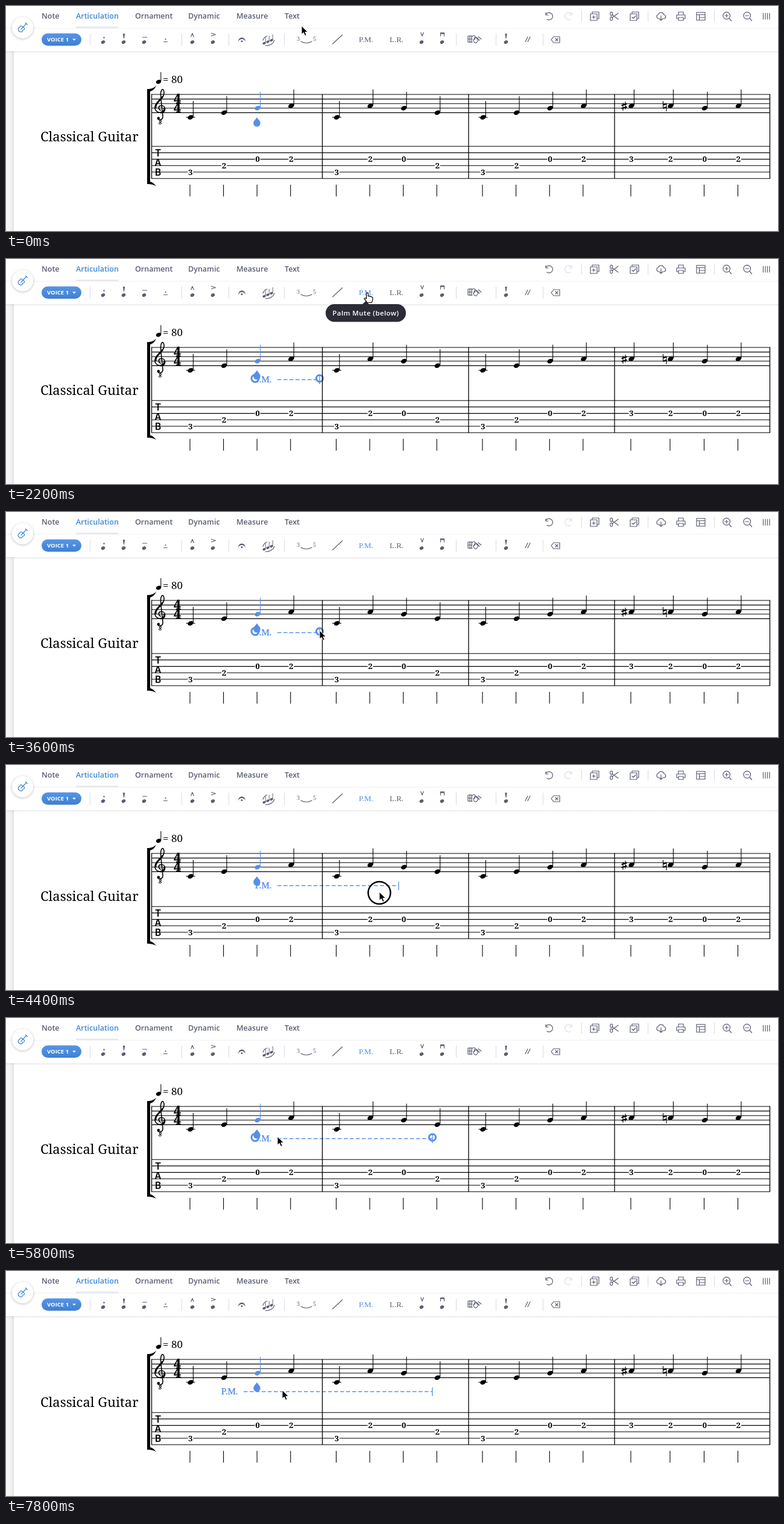
These frames come from a looping animation (1280 by 374 pixels, 8 s). An HTML page:

```html
<!DOCTYPE html>
<html lang="en">
<head>
<meta charset="utf-8">
<title>Palm mute demo</title>
<style>
html, body { margin: 0; height: 100%; overflow: hidden; background: #fff; }
svg { display: block; width: 100vw; height: 100vh; }
.ui { font: 600 12.5px "Open Sans", "Noto Sans", sans-serif; fill: #5a5e72; }
.serif { font: 13px "Liberation Serif", "Times New Roman", serif; }
.score { font-family: "Noto Serif", serif; }
.tab { font: bold 13px "Noto Serif", serif; text-anchor: middle; }
.icon { fill: none; stroke: #5a5e72; stroke-width: 1.2; stroke-linecap: round; stroke-linejoin: round; }
.solid { fill: #5a5e72; stroke: none; }
</style>
</head>
<body>
<svg id="stage" viewBox="0 0 1280 374" preserveAspectRatio="none">
  <defs>
    <linearGradient id="fade" x2="0" y2="1"><stop stop-color="#000" stop-opacity=".08"/><stop offset="1" stop-color="#000" stop-opacity="0"/></linearGradient>
    <linearGradient id="edge"><stop stop-color="#f7f7f7"/><stop offset=".6" stop-color="#f3f3f3"/><stop offset="1" stop-color="#e2e2e2"/></linearGradient>
    <linearGradient id="pill" x2="0" y2="1"><stop stop-color="#5596e6"/><stop offset="1" stop-color="#417fd2"/></linearGradient>
    <filter id="soft" x="-50%" y="-50%" width="200%" height="200%"><feDropShadow dx="0" dy="1" stdDeviation="2" flood-opacity=".28"/></filter>
  </defs>
  <rect width="1280" height="374" fill="#fff"/>
  <rect y="75" width="13" height="299" fill="url(#edge)"/>
  <g id="music"></g>
  <g id="lower"></g>
  <text id="name" class="score" x="57" font-size="22">Classical Guitar</text>
  <g id="mute" fill="none" stroke="#568fe6">
    <text id="label" y="205" class="serif" style="font-size:15px" fill="#568fe6" stroke-width=".35">P.M.</text>
    <path id="dash" stroke-width="1.3" stroke-dasharray="6.5 3.5"/>
    <path id="tick" stroke-width="1.3"/>
    <g id="handles" stroke-width="3">
      <circle id="from" cy="198.5" r="6" fill="#fff"/>
      <circle id="to" cy="198.5" r="5.5"/>
    </g>
  </g>
  <path d="M416 185C418 188.500 421.800 191 421.800 194.800A5.800 5.800 0 0 1 410.200 194.800C410.200 191 414 188.500 416 185Z" fill="#568fe6"/>
  <g id="bars"></g>
  <g id="tip">
    <path d="M590 76L596.500 70L603 76Z" fill="#2b2c38"/>
    <rect x="530" y="75" width="133" height="29.500" rx="14.500" fill="#2b2c38"/>
    <text x="596.500" y="94.300" text-anchor="middle" class="ui" style="font-size:11.5px;letter-spacing:.4px;fill:#fff">Palm Mute (below)</text>
  </g>
  <circle id="ring" r="18.500" fill="none" stroke="#000" stroke-width="2.500"/>
  <path id="arrow" d="M0 0V14.200L3.300 11.200L5.700 16.500L8.200 15.400L5.900 10.300H10.300Z" stroke="#fff" stroke-width="1"/>
  <path id="hand" d="M-1.500 8V1.200Q0-1 1.500 1.200V6Q3.200 4.800 4.300 6.400Q6 5.500 7 7.200Q9 6.800 9 9V12Q8 14 7.500 16.500H-.5Q-1.500 14-5 10Q-4.500 7.500-1.500 10Z" fill="#fff" stroke="#000" stroke-width="1.200" stroke-linejoin="round"/>
</svg>
<script>
const $ = id => document.getElementById(id);
const BLUE = '#568fe6', GREY = '#5a5e72';
const line = (d, color = '#000', w = 1.1) => `<path d="${d}" fill="none" stroke="${color}" stroke-width="${w}"/>`;
const text = (x, y, s, attrs = '') => `<text x="${x}" y="${y}" ${attrs}>${s}</text>`;
const head = (x, y, color = '#000', rx = 5, ry = 3.5) =>
  `<ellipse rx="${rx}" ry="${ry}" fill="${color}" transform="translate(${x} ${y}) rotate(-24)"/>`;
const icon = (x, y, d, extra = '') => `<g class="icon" transform="translate(${x} ${y})"><path d="${d}"/>${extra}</g>`;
const solid = d => `<path class="solid" d="${d}"/>`;

// Notes
const pitch = { C: [185, 3, 4], E: [177.3, 2, 3], G: [169.8, 0, 2], A: [166, 2, 2] };
const columns = [306, 548.5, 791].flatMap(x => [0, 1, 2, 3].map(i => x + i * 55.6)).concat(1037, 1102, 1158.500, 1214.500);
const notes = [...'CEGACAGECEGAAAGA'].map((p, i) => ({ x: columns[i], p, i }));
const barlines = [241.5, 524.5, 767, 1009, 1266.5];

function drawNote({ x, p, i }) {
  const y = pitch[p][0], color = i === 2 ? BLUE : '#000';
  return head(x, y, color) + line(`M${x + 4.400} ${y - 1}V${y - 27.300}`, color) +
    (p === 'C' ? line(`M${x - 7.500} 185H${x + 7.500}`) : '');
}

let music = '';
for (let i = 0; i < 5; i++) music += line(`M241 ${147 + i * 7.600}H1267`);
music += notes.map(drawNote).join('');
music += line('M1023 161V174M1027 159V172') + line('M1020.500 165.500L1029.500 162.500M1020.500 170.500L1029.500 167.500', '#000', 2.2);
music += line('M1089.500 158V169.500M1095 163V175') + line('M1089.500 164.500L1095 162.500M1089.500 170L1095 168', '#000', 2.2);
music += line('M257 173.500C252 172 252 165.500 257.500 165.500C265.500 165.500 266 177.300 257 177.300C246.500 177.300 244.500 168 250 161.500C255 155.500 263 151 262 143C261 136 257.500 138 256.500 145C256 150 259 172 260 183C260.500 190 252.500 191 251.500 187', '#000', 1.6);
music += line('M262.600 170C263 176 259 177.300 256 177M248 170C247.500 166 250 161.500 253 158.500L260 150.500', '#000', 2.9);
music += '<circle cx="252.800" cy="186.500" r="2.300"/>';
music += text(255.5, 197, '8', 'class="score" font-size="9" font-weight="bold" font-style="italic" text-anchor="middle"');
music += [162, 177].map(y => text(284, y, '4', 'class="score" font-size="21" font-weight="900" text-anchor="middle" stroke="#000" stroke-width=".5"')).join('');
music += head(253, 126, '#000', 4.300, 3.200) + line('M256.800 125V110') + text(260, 127.500, '= 80', 'class="score" font-size="17"');

// Tablature, drawn in its unshifted place
let lower = '';
for (let i = 0; i < 6; i++) lower += line(`M241 ${233.2 + i * 10.700}H1267`);
[...'TAB'].forEach((c, i) => lower += text(252, 249.5 + i * 16, c, 'text-anchor="middle" style="font:600 15.500px Inter,sans-serif"'));
for (const { x, p, i } of notes) {
  const [, fret, row] = pitch[p], y = 233.2 + row * 10.7;
  lower += `<rect x="${x - 4.500}" y="${y - 4}" width="9" height="8" fill="#fff"/>` +
    text(x, y + 4.600, i === 12 ? 3 : fret, 'class="tab"') + line(`M${x - 1} 297V316.500`);
}
$('music').innerHTML = music;
$('lower').innerHTML = lower;

function drawBars(shift) {
  const end = 287 + shift, b = 295 + shift / 2;
  return barlines.map(x => line(`M${x} 146.500V${end}`, '#000', 1.3)).join('') +
    `<path d="M234 138C241 138 246 136 249 132C247 138 243 141 239 142V${b - 3}C243 ${b - 2} 247 ${b + 1} 249 ${b + 5}C246 ${b + 2} 241 ${b + 1} 234 ${b + 1}Z"/>`;
}

// Toolbars
const small = x => head(x, 60, GREY, 3.400, 2.600);
const separators = (xs, y, h) => xs.map(x => line(`M${x} ${y}v${h}`, '#dcdce2', 1)).join('');
const wedge = 'M-1.700-4H1.700L.5 4H-.5Z';
const page = 'M-4-4V-7H7V4H4M-7-4H4V7H-7Z';
const lens = 'M4.500 4L7.500 7.500M5.500-1A5.800 5.800 0 1 1-6.100-1A5.800 5.800 0 1 1 5.500-1M-3-1H2.500';
const undo = 'M-6-6V-2H-2M-6-2.500A6 6 0 1 1-4 5';
let tools = `<rect width="1280" height="75" fill="#fff"/><rect y="75" width="1280" height="4" fill="url(#fade)"/>` +
  line('M0 37H1280', '#f0f0f2', 1) + line('M116 35.500H186', '#e2e4ea', 2);
[['Note', 59], ['Articulation', 116], ['Ornament', 214], ['Dynamic', 302], ['Measure', 382], ['Text', 462]].forEach(([s, x]) =>
  tools += text(x, 21.300, s, `class="ui"${x === 116 ? ' style="fill:#3f87d9"' : ''}`));
tools += separators([954.5, 1064.5, 1174.5], 8, 18) + separators([139.5, 291.5, 369.5, 461.5, 746.5, 812.5, 890.5], 46, 20);
tools += icon(901, 17, undo) + `<g opacity=".2">${icon(932, 17, 'M6-6V-2H2M6-2.500A6 6 0 1 0 4 5')}</g>` +
  icon(976, 17, page + 'M-1.500-1V4M-4 1.500H1') +
  icon(1009, 17, 'M-4-2.500L6 5M-4 2.500L6-5M-3.500-4A2 2 0 1 1-7-4A2 2 0 1 1-3.500-4M-3.500 4A2 2 0 1 1-7 4A2 2 0 1 1-3.500 4') +
  icon(1042, 17, page + 'M-4 1.500L-2 3.500L2-.5') +
  icon(1086, 17, 'M-3 4H-4A3.600 3.600 0 0 1-4.500-3A5 5 0 0 1 5-2.500A3.300 3.300 0 0 1 5 4H3M0-1V7M-2.500 4.500L0 7L2.500 4.500') +
  icon(1119, 17, 'M-4-2V-7H4V-2M-4 4H-7V-2H7V4H4M-4 2H4V7H-4Z') +
  icon(1152, 17, 'M-7-6.500H7V6.500H-7ZM-7-2.500H7M-2.500-2.500V6.500M-2.500 2H7') +
  icon(1195, 17, lens + 'M-.3-3.700V1.700') + icon(1229, 17, lens) +
  icon(1261, 17, 'M-5.500-5V5M-2-5V5M1.500-5V5M5-5V5');
tools += `<rect x="59" y="45.500" width="66" height="20.500" rx="10.250" fill="url(#pill)"/>` +
  text(68, 59.200, 'VOICE 1', 'fill="#fff" style="font:bold 9.500px Open Sans,sans-serif"') + '<path d="M110 54.500H116L113 57.500Z" fill="#fff"/>';
tools += [161, 195, 229, 309, 343, 689, 723, 829].map(small).join('');
tools += '<g fill="#5a5e72"><circle cx="162.500" cy="52.500" r="1.200"/><circle cx="264.500" cy="55" r="1.100"/></g>' +
  icon(195.500, 50, '', solid(wedge)) + icon(829, 50, '', solid(wedge)) +
  icon(230, 52, 'M-3.500 0H3.500') + icon(264.500, 59.500, 'M-3 0H3') +
  icon(309, 48, 'M-2.300 3L0-2.500L2.300 3') + icon(344, 47.500, 'M-3.500-2.300L3.500 0L-3.500 2.300') +
  icon(391, 56, '', solid('M-6 3.500C-6-6 6-6 6 3.500C4.500-2.500-4.500-2.500-6 3.500Z') + '<circle class="solid" cy="2.500" r="1.500"/>');
[[428, 62], [434, 59.500], [440, 57]].forEach(([x, y]) =>
  tools += head(x, y, GREY, 2.700, 2) + line(`M${x + 2.300} ${y}V${y - 10}`, GREY, .9));
tools += icon(435, 62, 'M-5 4Q7 4 10-5M-9-5Q-6-12-2-12');
tools += icon(498, 58, 'M-9 1Q0 6 9 1') + text(482, 58, '3', 'class="serif" style="font-size:10px" fill="#5a5e72"') +
  text(509, 58, '5', 'class="serif" style="font-size:10px" fill="#5a5e72"') + icon(549.500, 55.500, 'M-8 7.500L8-7.500');
tools += text(585, 60.300, 'P.M.', 'id="button" class="serif"') + text(636, 60.300, 'L.R.', 'class="serif" fill="#5a5e72"');
tools += icon(690, 47, 'M-2.300-3L0 3L2.300-3') + icon(723.500, 47, 'M-3 3V-2.500H3V3', solid('M-3-3H3V-.5H-3Z'));
tools += icon(776, 55, 'M-10-5V5M-7-6V6M-4-6V6M-10-5H-4M-10 0H-3M-10 5H-3M-3-4Q0-8 2-4L-1 2Q0 7 4 6L7 2M2-4L6 1M4-3L9 2M7-4L12 0M-1 2L2-1') +
  icon(865, 55.500, 'M-4 4L0-4M0 4L4-4') + icon(911, 56, 'M-7 0L-3-5H7V5H-3ZM0-2L4 2M4-2L0 2');
tools += '<circle cx="27.500" cy="36" r="17.500" fill="#fff" filter="url(#soft)"/>' +
  `<g transform="translate(27.500 36)" fill="none" stroke="#3f87d9" stroke-width="1.200" stroke-linecap="round"><path d="M-1.500-2.500C-3-4-5-2-4.500-.5C-8 0-8 4-5.500 6C-3 8 .5 7 .5 4C3 4 4 2 2.500 .5ZM-2.500 2.500L6-6.500M5-8L8-5"/></g>`;
const bar = document.createElementNS('http://www.w3.org/2000/svg', 'g');
bar.innerHTML = tools;
$('stage').insertBefore(bar, $('tip'));

// Pointer: time, x, y
const path = [[0, 490, 33], [200, 500, 36], [800, 599, 56], [2400, 599, 56], [2600, 590, 70], [3400, 520, 197],
  [3800, 520, 197], [4400, 619, 211], [5000, 705, 204], [5200, 690, 201], [5800, 450, 197], [6200, 414, 198],
  [6800, 366, 200], [7000, 364, 200], [7600, 458, 198], [8000, 458, 198]];
function pointer(t) {
  const i = path.findIndex(k => k[0] > t), a = path[i - 1], b = path[i];
  const f = (t - a[0]) / (b[0] - a[0]);
  return [1, 2].map(n => a[n] + (b[n] - a[n]) * f);
}
const show = (id, on) => $(id).style.display = on ? '' : 'none';
const within = (t, a, b) => t >= a && t < b;
let last;

function draw(now) {
  const t = Math.floor(now % 8000 / 200) * 200;
  requestAnimationFrame(draw);
  if (t === last) return;
  last = t;
  const [x, y] = pointer(t), added = t >= 1600, over = within(t, 800, 2600);
  const dragging = within(t, 3800, 5000) || within(t, 6200, 7000);
  const start = t >= 6200 && (t >= 6800 || x < 385) ? 357 : 413;
  const end = t >= 5000 ? 707 : t < 3800 || x < 548 ? 520 : x < 603 ? 595 : x < 659 ? 651 : 707;
  const shift = added ? 2 : 0;
  $('lower').setAttribute('transform', `translate(0 ${shift})`);
  $('name').setAttribute('y', 224.5 + shift / 2);
  $('bars').innerHTML = drawBars(shift);
  $('label').setAttribute('x', start);
  $('dash').setAttribute('d', `M${start + 37} 200.500H${end}`);
  $('tick').setAttribute('d', `M${end} 193.500V208`);
  $('from').setAttribute('cx', start);
  $('to').setAttribute('cx', end);
  $('button').setAttribute('fill', added ? '#4a90e2' : GREY);
  show('mute', added);
  show('handles', !dragging && t < 7400);
  show('tip', over);
  show('ring', dragging || t === 1400);
  show('hand', over);
  show('arrow', !over);
  $('ring').setAttribute('cx', x);
  $('ring').setAttribute('cy', y + 1.5);
  for (const id of ['arrow', 'hand']) $(id).setAttribute('transform', `translate(${x} ${y})`);
}
draw(0);
</script>
</body>
</html>
```
